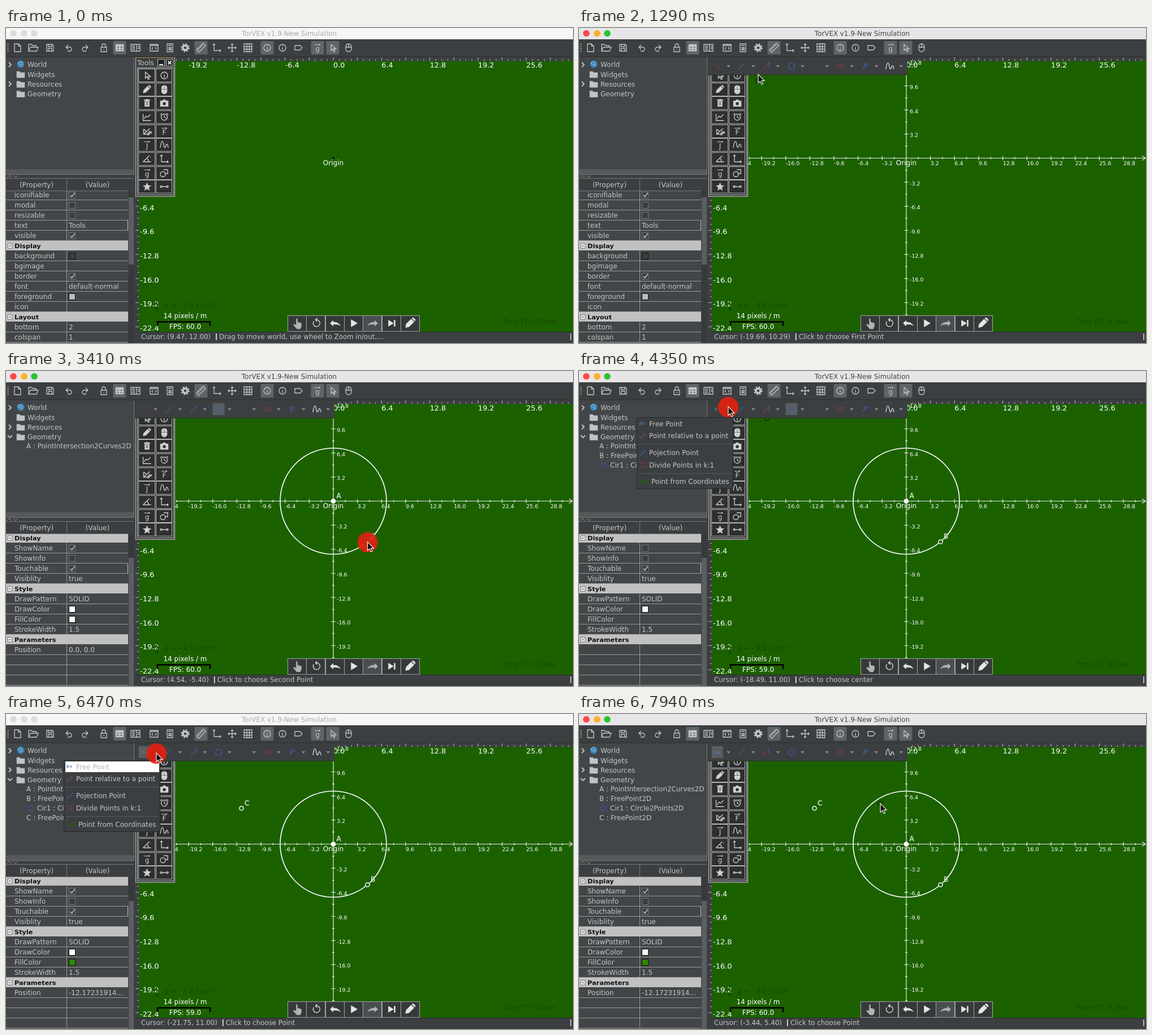
Recreate the animation shown at these times as an HTML page. Size 1003x558 px, loop 8000 ms.

```html
<!DOCTYPE html>
<html lang="en">
<head>
<meta charset="utf-8">
<title>Geometry tools</title>
<style>
html, body { margin: 0; width: 100%; height: 100%; overflow: hidden; background: #3c3f41; }
svg { display: block; width: 1003px; height: 558px; }
text { font: 12px "DejaVu Sans", Verdana, sans-serif; white-space: pre; }
.bold { font-weight: bold; }
.slant { font-style: italic; }
</style>
</head>
<body>
<svg id="app" viewBox="0 0 1003 558" xmlns="http://www.w3.org/2000/svg"></svg>
<script>
const LOOP = 8000, OX = 579, OY = 230.5, PX = 13.333, STEP = 3.2;
const PANEL = "#3c3f41", TREE = "#424648", INK = "#c4c5c5", GREEN = "#1c6100", WHITE = "#fff", FAINT = "#184700";
const app = document.getElementById("app");
const $ = id => document.getElementById(id);

// Markup helpers; text is placed by its vertical middle
const rect = (x, y, w, h, fill, extra = "") => `<rect x="${x}" y="${y}" width="${w}" height="${h}" fill="${fill}" ${extra}/>`;
const path = (d, stroke = INK, w = 1.3, fill = "none", extra = "") =>
  `<path d="${d}" fill="${fill}" stroke="${stroke}" stroke-width="${w}" ${extra}/>`;
const circle = (x, y, r, fill, extra = "") => `<circle cx="${x}" cy="${y}" r="${r}" fill="${fill}" ${extra}/>`;
const text = (x, y, s, fill = INK, size = 12, extra = "") =>
  `<text x="${x}" y="${y + size * .365}" fill="${fill}" style="font-size:${size}px" ${extra}>${s}</text>`;
const mid = (x, y, s, fill, size, extra = "") => text(x, y, s, fill, size, `text-anchor="middle" ${extra}`);
const group = (id, body, extra = "") => `<g id="${id}" ${extra}>${body}</g>`;
const ring = r => `M${-r} 0a${r} ${r} 0 1 0 ${2 * r} 0a${r} ${r} 0 1 0 ${-2 * r} 0`;
const range = (a, b) => Array.from({ length: b - a + 1 }, (_, i) => a + i);

// "!" marks a filled shape, "~" a letter under an arrow
function icon(x, y, d, color = INK, scale = 1) {
  const at = `transform="translate(${x} ${y}) scale(${scale})"`;
  if (d[0] === "~") return `<g ${at}>` + mid(0, 1.5, d[1], color, 12) + path("M-5-5.500H5M3-7l2 1.500L3-4", color, 1) + "</g>";
  return d[0] === "!" ? path(d.slice(1), color, .5, color, at + ' fill-rule="evenodd"') : path(d, color, 1.3, "none", at);
}

const ICON = {
  arrow: "M-3-6v11l3-3 2 5 2-1-2-4h4Z",
  info: ring(6) + "M0-3.5v1M0-1v5",
  pencil: "!M-7 6l1-5 7-7 4 4-7 7ZM2-7l2-1 3 3-1 2Z",
  mouse: "!M-5-1v-2a5 5 0 0 1 4.5-4.500v6.500ZM.5-7.500A5 5 0 0 1 5-3v2H.500ZM-5 0H5v3a5 5 0 0 1-10 0Z",
  trash: "!M-5-6h3l1-1h2l1 1h3v2H-5ZM-4-3H4v9h-8ZM-2-1l1.500 2L-2 3l1 1 1-1.500L1 4l1-1-1.500-2L2-1 1-2 0-.5-1-2Z",
  camera: "!M-7-4h4l1-2h4l1 2h4v10h-14ZM-3 1a3 3 0 1 0 6 0a3 3 0 1 0-6 0Z",
  graph: "M-7-6V6H7M-5 3l3-5 3 2 5-5",
  clock: ring(5.500) + "M0-3v3l3 2M-7-4l3-3M7-4l-3-3",
  vector: "M-6 5L5-5M-6-4l5 4M-6-4v9h9M1 2l3 3-3 2M4-1v7M4 2h4M6 0l2 2-2 2",
  curve: "M-7 5c2-16 5-12 6-5s3 5 4 1 3-3 4 4",
  angle: "M-7 5H7M-7 5L4-6M0-1q3 2 2 6M6-4v1",
  axes: "M-5-7V5H7M-7-5l2-2 2 2M5 3l2 2-2 2",
  shapes: "M-1-6H6V1H1M-7 2a4.500 4.500 0 1 0 9 0a4.500 4.500 0 1 0-9 0",
  star: "!M0-7l2 5 5 .3-4 3.300 1.400 5L0 4l-4.400 2.600 1.400-5-4-3.300 5-.3Z",
  link: "M-5 0H5M-7 0a1.500 1.500 0 1 0 3 0a1.500 1.500 0 1 0-3 0M4 0a1.500 1.500 0 1 0 3 0a1.500 1.500 0 1 0-3 0",
  undo: "M-5-1H2a4 4 0 0 1 0 7H-3M-2-5l-4 4 4 4",
  redo: "M5-1H-2a4 4 0 0 0 0 7H3M2-5l4 4-4 4",
  folder: "!M-7-5h5l2 2h7V6H-7Z"
};

function titleBar() {
  return rect(0, 0, 1003, 20, "#f6f6f6", 'id="bar"') +
    [13, 32, 50].map((x, i) => circle(x, 9.500, 5.800, "#dcdcdc", `id="light${i}"`)).join("") +
    mid(501, 10, "TorVEX v1.9-New Simulation", "#aaa", 11.900, 'id="title"');
}

function mainToolbar() {
  const items = [
    [20, "M-5-7H2l4 4V7H-5ZM2-7v4h4"], [48, "M-8 6V-6h5l2 2h6v3M-8 6l3-7H9L6 6Z"],
    [78, "M-6-6H4l2 2V6H-6ZM-3-6v4h6v-4M-3 6V1h6v5"], [112, ICON.undo], [139, ICON.redo],
    [173, "M-5-1H5V7H-5ZM-3-1v-3a3 3 0 0 1 6 0v3M0 2v2"], [201, "!M-7-6H7V6H-7ZM-5-2V0h4v-2ZM1-2V0h4v-2ZM-5 2v2h4V2ZM1 2v2h4V2Z", 1],
    [229, "M-8-6H8V6H-8ZM2-6V6M-6-3h5M-6 0h5M-6 3h5M4-2h3M4 1h3"], [262, "M-7-6H7V6H-7ZM-7-4H7M-2-1l-2 2 2 2M2-1l2 2-2 2"],
    [290, "M-5-7H5V7H-5ZM-3-4H3M-3 0H3M-3 3H3M-1-1V5M2-1V5"], [317, ""],
    [345, "M-8 4L4-8l4 4L-4 8ZM-5 1l2 2M-2-2l2 2M1-5l2 2", 1], [373, ICON.axes],
    [400, "M0-7V7M-7 0H7M-2-5l2-2 2 2M-2 5l2 2 2-2M-5-2l-2 2 2 2M5-2l2 2-2 2"],
    [428, "M-7-7H7V7H-7ZM-2-7V7M2.500-7V7M-7-2H7M-7 2.500H7"], [462, ICON.info, 1], [489, ICON.info],
    [517, "M-6-4H3l4 4-4 4h-9Z"], [551, "~g", 1], [578, ICON.arrow, 1], [606, "M-5-2a5 5 0 0 1 10 0v4a5 5 0 0 1-10 0ZM-5-1H5M0-7v6"]
  ];
  return rect(0, 20, 1003, 32, PANEL) + path("M0 51H1003", "#2c2e2f", 1) + path("M3.500 28v14", "#aaa", 2, "none", 'stroke-dasharray="2 2"') +
    items.map(([x, d, on]) => (on ? rect(x - 11.500, 23, 23, 24, "#5f6467", 'rx="2"') : "") + (d ? icon(x, 35, d) : "")).join("") +
    circle(317, 35, 4, "none", `stroke="${INK}" stroke-width="3.500"`) +
    circle(317, 35, 6.500, "none", `stroke="${INK}" stroke-width="2.500" stroke-dasharray="2.600 2.500"`);
}

function tree() {
  const rows = ["World", "Widgets", "Resources", "Geometry"];
  const chevron = y => path(`M5 ${y - 4}l4 4-4 4`, INK, 1.800);
  return rect(0, 52, 229, 506, PANEL) + rect(-.5, 51.500, 227, 208, TREE, 'stroke="#777" stroke-width="1"') +
    rows.map((s, i) => text(38, 65 + 17.200 * i, s) + (i ? icon(26, 82 + 17.200 * (i - 1), ICON.folder, "#bfc3c5") : "")).join("") +
    circle(26, 64, 6.500, "#3b83b7") + path("M21 62q5-4 8 0l-3 4zM27 68l3-3", "#a8c8d8", 1) +
    chevron(65) + chevron(99) + group("expand", path("M3 114l4 4 4-4", INK, 1.800)) +
    group("rowA", text(36, 133, "A : PointIntersection2Curves2D", INK, 11.900)) +
    group("rowB", text(36, 150, "B : FreePoint2D") + circle(43, 167, 5, "none", 'stroke="#3d4fa8" stroke-width="1.200"') +
      text(55, 167, "Cir1 : Circle2Points2D")) +
    group("rowC", text(36, 184, "C : FreePoint2D")) +
    rect(0, 250, 226, 9, "#55595b") + path("M2 265l4-4 4 4M13 261l4 4 4-4", "#999", 1);
}

function props(id, rows, thumb) {
  let out = rect(0, 287, 216, 271, TREE) + rect(217, 289, 9, 269, "#37393b") + rect(217, thumb[0], 9, thumb[1], "#5b5f61");
  rows.forEach((row, i) => {
    const y = 287 + 18 * i, c = y + 9, [name, value = ""] = row.split("|");
    if (name[0] === "*") {
      out += rect(0, y, 216, 17, "#c1c1c1") + rect(3, c - 4, 8, 8, "#eee", 'stroke="#777"') + path(`M5 ${c}h4`, "#333", 1) +
        text(15, c, name.slice(1), "#111", 11.300, 'class="bold"');
      return;
    }
    out += path(`M0 ${y + 17.500}H216M107.500 ${y - .5}v18`, "#999", 1) + text(15, c, name);
    if (value[0] === "[") {
      out += rect(111.500, c - 5.500, 11, 11, "#3b3e40", 'stroke="#777"');
      if (value[1] === "x") out += path(`M114 ${c}l2.500 3 5-7`, INK, 1.500);
    } else if (value[0] === "#") out += rect(111.500, c - 5.500, 11, 11, value, 'stroke="#111"');
    else out += text(111, c, value);
  });
  return group(id, out + path("M215.500 341v17", "#ccc", 1));
}

function propPanels() {
  const shape = (name, fill, pos) => ["*Display", "ShowName|" + name, "ShowInfo|[ ]", "Touchable|[x]", "Visiblity|true", "*Style",
    "DrawPattern|SOLID", "DrawColor|#ffffff", "FillColor|" + fill, "StrokeWidth|1.5", "*Parameters", pos, "", "", ""];
  const tools = ["iconifiable|[x]", "modal|[ ]", "resizable|[ ]", "text|Tools", "visible|[x]", "*Display", "background|#3c3f41", "bgimage",
    "border|[x]", "font|default-normal", "foreground|#bbbbbb", "icon", "*Layout", "bottom|2", "colspan|1"];
  return props("propsTools", tools, [300, 119]) + props("propsA", shape("[x]", "#ffffff", "Position|0.0, 0.0"), [331, 227]) +
    props("propsCircle", shape("[ ]", "", ""), [331, 227]) +
    props("propsC", shape("[x]", "#2a8a00", "Position|-12.17231914..."), [331, 227]) +
    rect(0, 266, 226, 22, PANEL) + path("M0 266.500H226M0 288.500H216M107.500 267v22", "#777", 1) +
    mid(54, 277.5, "(Property)") + mid(162, 277.5, "(Value)");
}

function axes() {
  let d = `M300 ${OY}H1002M996 ${OY - 4}l6 4-6 4M${OX} 58V538`, labels = "";
  for (const i of range(-13, 19)) d += `M${OX + i * 21.333} ${OY - (i % 2 ? 2 : 3.500)}v${i % 2 ? 4 : 7}`;
  for (const i of range(-8, 14)) d += `M${OX - (i % 2 ? 2 : 3.500)} ${OY + i * 21.333}h${i % 2 ? 4 : 7}`;
  for (const i of range(-7, 9)) if (i) labels += text(OX + i * STEP * PX, 240, (i * STEP).toFixed(1), WHITE, 9.500);
  for (const i of range(-4, 6)) if (i) labels += text(585, OY + i * STEP * PX + 2, (-i * STEP).toFixed(1), WHITE, 9.500);
  return group("axes", path(d, "#e4eee0", 1.200) + labels);
}

const point = (x, y, name, fill) => circle(x, y, 3.600, fill, 'stroke="#fff" stroke-width="1.500"') +
  text(x + 5.500, y - 9.5, name, "#dce6d8", 12, 'stroke="#dce6d8" stroke-width=".3"');

function controls() {
  const icons = ["!M-2-8q2-1.500 2 1v5l7 2v5l-2 5h-6l-6-7 1-1.500 4 2Z", "M-4-3.500a6 6 0 1 0 4-2.500M2-9l-3 3 3 3",
    "!M-9 0l5-5v3q8-1 13 6-5-3-13-2v3Z", "!M-5-6.500L6 0-5 6.500Z", "!M9 0L4-5v3q-8-1-13 6 5-3 13-2v3Z",
    "!M-6-5.500L3 0l-9 5.500ZM4-5.500h2v11H4Z", ICON.pencil];
  return icons.map((d, i) => {
    const x = Math.round(499 + 33.3 * i) - .5;
    return rect(x, 509.500, 33, 28, i === 4 ? "#4b4e50" : "#36393a", 'stroke="#a4a6a6"') +
      icon(x + 17, 523, d, i === 0 || i === 4 ? "#b4b4b4" : "#e6e6e6", i === 6 ? 1.25 : 1);
  }).join("");
}

function stage() {
  let ticks = "", labels = "";
  for (const i of range(-32, 39)) ticks += `M${OX + i * 10.667} 58v${i % 4 ? -3 : -6}`;
  for (const i of range(-16, 28)) ticks += `M235 ${OY + i * 10.667}h${i % 4 ? -3 : -6}`;
  for (const i of range(-3, 4)) labels += text(OX + i * 85.333, 65, (i * 6.4).toFixed(1), WHITE, 12.800);
  for (const i of range(2, 7)) labels += text(237, OY + i * 42.667 + 2, (-i * STEP).toFixed(1), WHITE, 13);
  return rect(229, 52, 774, 486, GREEN) + rect(229, 52, 774, 6.500, PANEL) + rect(229, 52, 6, 486, PANEL) +
    path(ticks, "#bbb", 1) + labels + axes() + circle(OX, OY, 2, "#111", 'id="dot"') +
    mid(OX, 239, "Origin", WHITE) +
    text(280, 490.5, "g = - 9.8 j m/s²", FAINT, 12, 'class="slant"') + path("M267 484v16M264 496l3 5 3-5", FAINT, 1.300) +
    text(879, 520, "Time (T): 0.0sec", FAINT, 11.800) +
    mid(317, 510, "14 pixels / m", WHITE) + path("M268 528v-7.500H361v7.500", "#000", 2.600) + mid(317, 529, "FPS: 60.0", WHITE, 12, 'id="fps"') +
    circle(OX, OY, 0, "none", 'id="round" stroke="#fff" stroke-width="1.600"') +
    group("ptA", point(OX, OY, "A", WHITE)) + group("ptB", point(639.5, 302.5, "B", GREEN)) + group("ptC", point(416.5, 167, "C", GREEN)) +
    circle(0, 0, 4, "none", 'id="marker" stroke="#0c2404" stroke-width="1.400"') +
    group("hover", circle(OX, OY, 4, "#c9cfc6") + rect(593, 236, 104, 16, WHITE) + mid(645, 243.500, "new intersection", GREEN, 11.800)) +
    controls();
}

function toolsPanel() {
  const names = ["arrow", "info", "pencil", "mouse", "trash", "camera", "graph", "clock", "vector", "~F", "~J", "curve",
    "angle", "axes", "~g", "shapes", "star", "link"];
  const top = i => Math.round(72 + (i >> 1) * 24.65);
  const cell = (i, fill, extra) => rect(i % 2 ? 265.500 : 234.500, top(i) + .5, i % 2 ? 28 : 29, 23, fill, extra);
  const dash = i => cell(i, "none", 'stroke="#fff" stroke-dasharray="1 1"');
  return rect(229.5, 52.500, 69, 246, PANEL, 'stroke="#c0c0c0"') + path("M229 52.500H299", "#b98a55", 1) +
    rect(232.500, 70.500, 64, 225, "#27292a", 'stroke="#c0c0c0"') + text(232, 61.5, "Tools") +
    rect(268.500, 55.500, 12, 12, "#222", 'stroke="#bbb"') + rect(283.500, 55.500, 12, 12, "#222", 'stroke="#bbb"') +
    path("M271 65h7M286.500 58.500l6 6M292.500 58.500l-6 6", "#eee", 1.800) +
    names.map((n, i) => cell(i, "#2d2f30", 'stroke="#b4b6b6"') + icon(i % 2 ? 280 : 249.500, top(i) + 12, ICON[n] || n, "#d0d0d0")).join("") +
    group("focus0", dash(0)) + group("focus15", dash(15));
}

const BLUE = "#3566b5", RED = "#94393b";
const pointIcon = (x, y) => path(`M${x - 4} ${y + 3}v-5h3v3h-3`, "#4f7fae", 1) + circle(x + 3, y, 1.400, "none", 'stroke="#4f7fae"');

function shapeToolbar() {
  const at = i => 245 + 43.600 * i;
  const drops = range(0, 7).map(i => path(`M${at(i) + 16} 66h7l-3.500 4Z`, "none", 0, "#85898b")).join("");
  return group("shapes", rect(229, 52, 352, 31, PANEL) + path("M229 83H581", "#2a3a25", 1.500) +
    rect(365.500, 57, 21, 21, "#595d60", 'id="pickCircle"') + rect(234.500, 57, 20, 21, "#595d60", 'id="pickPoint"') + drops +
    group("dots", path("M240 64l3 2M247 62l2 3M241 72l3-1M246 68l4 4", RED, 1.300)) + group("pIcon", pointIcon(245, 68)) +
    path("M282 73l11-11M502 63h8M506 64l-4 9M504 70l7-6", BLUE, 1.200, "none", 'stroke-dasharray="4 1"') +
    path("M413 65l4 2 6-3", "#2f4a78", 1) +
    path("M326 73l6-6", RED, 1.400) + path("M333 66l3-4v8", BLUE, 1.200) +
    circle(376, 68, 5.500, "none", `stroke="${BLUE}" stroke-width="1.200"`) +
    `<ellipse cx="462.500" cy="68" rx="6" ry="3.500" fill="none" stroke="${RED}" stroke-width="1.200"/>` + circle(462.5, 68, 1, BLUE) +
    icon(550, 68, ICON.curve, "#ddd"));
}

function popup() {
  const rows = [[115, "Point relative to a point"], [145, "Pojection Point"], [167, "Divide Points in k:1"]];
  return group("popup", rect(102.5, 82.5, 170, 126, PANEL, 'stroke="#25282a"') +
    rect(105, 84, 166, 19, WHITE, 'id="lit"') + text(124, 93.500, "Free Point", INK, 12, 'id="free"') + pointIcon(112, 93) +
    rows.map(([y, s]) => text(124, y, s)).join("") + text(128, 196, "Point from Coordinates") +
    path("M106 129.500H270M106 181.500H270", "#565a5c", 1) + path("M108 119l4-4M114 112l3-1", RED, 1.600) +
    path("M113 117l4-5M108 150l10-10", BLUE, 1.200) + path("M108 163l3 1M114 162l2 2M109 170l3-1M114 168l4 3", RED, 1.600) +
    path("M108 196h13", "#285a18", 5, "none", 'stroke-dasharray="3 1"'));
}

app.innerHTML = stage() + toolsPanel() + shapeToolbar() + tree() + propPanels() +
  rect(229, 538, 774, 20, PANEL) + path("M229 538.500H1003", "#2c2e2f", 1) + path("M999 541v12", "#ddd", 1.500) +
  text(239, 547, "", INK, 11.800, 'id="where"') + path("M0 541v12", "#ddd", 1.800, "none", 'id="bar2"') +
  text(0, 547, "", INK, 11.800, 'id="hint"') + mainToolbar() + titleBar() + popup() +
  circle(0, 0, 18, "#df2210", 'id="press"') +
  group("mouse", path("M0 0V15.500l3.500-3.200 2.500 5.500 2.500-1.100-2.500-5.300h5Z", WHITE, 1.100, "#0a0a0a"));

// Pointer route: time, x, y
const ROUTE = [[120, 334, 264], [180, 308, 257], [350, 308, 257], [520, 281, 256], [760, 281, 256], [1200, 316.5, 95], [1290, 317, 82],
  [1380, 317, 82], [1720, 376, 68], [2020, 376, 68], [2440, 585.1, 235.2], [2680, 585.1, 235.2], [3060, 639.5, 302.5],
  [3500, 639.5, 302.5], [4120, 264, 63], [4480, 264, 63], [4760, 254, 91], [5000, 254, 91], [5440, 416.75, 167],
  [5700, 416.75, 167], [6300, 266, 69], [6640, 266, 69], [6940, 254, 91], [7120, 254, 91], [7180, 255, 92], [7440, 255, 92],
  [7920, 533.15, 158.5]];
const PRESSES = [540, 1740, 2590, 3360, 4280, 4800, 5500, 6400, 7350];
// Spans in which the pointer is off the canvas: from, to, last coordinates
const HELD = [[0, 120, 9.47, 12], [400, 900, -20.85, -1.95], [1240, 2080, -19.69, 10.29], [4060, 5060, -18.49, 11], [6180, 7520, -21.75, 11]];
const within = (t, ...spans) => spans.some(([a, b]) => t >= a && t < b);
const show = (id, on) => { $(id).style.display = on ? "" : "none"; };

function pointer(t) {
  const i = ROUTE.findIndex(k => k[0] > t);
  if (i < 0) return ROUTE[ROUTE.length - 1].slice(1);
  if (i === 0) return ROUTE[0].slice(1);
  const [t0, x0, y0] = ROUTE[i - 1], [t1, x1, y1] = ROUTE[i];
  const p = (t - t0) / (t1 - t0), e = p * p * (3 - 2 * p);
  return [x0 + (x1 - x0) * e, y0 + (y1 - y0) * e];
}

function hintAt(t) {
  if (t < 660) return "Drag to move world, use wheel to Zoom in/out,...";
  if (t < 2000) return "Click to choose First Point";
  if (t >= 5000) return "Click to choose Point";
  return within(t, [2640, 3480]) ? "Click to choose Second Point" : "Click to choose center";
}

function update(t) {
  const [x, y] = pointer(t);
  const open = t >= 660, menu = within(t, [4320, 5000], [6420, 7480]), lit = within(t, [4420, 5000], [6450, 7480]);
  const active = t >= 560 && !lit;

  $("bar").setAttribute("fill", active ? "#e7e5e7" : "#f6f6f6");
  $("title").setAttribute("fill", active ? "#444" : "#aaa");
  ["#fb4948", "#fdb024", "#29c231"].forEach((c, i) => $("light" + i).setAttribute("fill", active ? c : "#dcdcdc"));

  show("axes", open); show("shapes", open); show("dot", !open);
  show("focus0", t < 560); show("focus15", within(t, [560, 4320]));
  show("pickCircle", within(t, [2000, 5000])); show("pickPoint", t >= 5000);
  show("dots", t < 4320); show("pIcon", t >= 4320);
  show("popup", menu); show("lit", lit);
  $("free").setAttribute("fill", lit ? "#b4b4b4" : INK);

  const expanded = t >= 2640, drawn = t >= 3480, placed = t >= 5640;
  show("expand", expanded); show("rowA", expanded); show("rowB", drawn); show("rowC", placed);
  show("propsTools", !expanded); show("propsA", expanded && !drawn); show("propsCircle", drawn && !placed); show("propsC", placed);

  show("hover", within(t, [2400, 2640])); show("ptA", expanded); show("ptB", t >= 3400); show("ptC", t >= 5500);
  const r = t < 2700 ? 0 : t < 3060 ? Math.hypot(x - OX, y - OY) : 94;
  $("round").setAttribute("r", r);
  $("fps").textContent = within(t, [4200, 4940], [6000, 6800]) ? "FPS: 59.0" : "FPS: 60.0";

  const held = HELD.find(h => within(t, h));
  const [wx, wy] = held ? held.slice(2) : [(x - OX) / PX, (OY - y) / PX];
  $("marker").setAttribute("transform", `translate(${OX + wx * PX} ${OY - wy * PX})`);
  show("marker", open && !within(t, [2400, 2640]));
  $("where").textContent = `Cursor: (${wx.toFixed(2)}, ${wy.toFixed(2)})`;
  const end = 239 + $("where").getComputedTextLength();
  $("bar2").setAttribute("transform", `translate(${end + 10} 0)`);
  $("hint").setAttribute("x", end + 15);
  $("hint").textContent = hintAt(t);

  show("mouse", t >= 120);
  $("mouse").setAttribute("transform", `translate(${x} ${y})`);
  const start = PRESSES.find(s => within(t, [s, s + 240])), p = (t - start) / 240;
  show("press", start !== undefined);
  if (start !== undefined) {
    $("press").setAttribute("transform", `translate(${x} ${y + 1})`);
    $("press").setAttribute("r", 17.5 + 2 * p);
    $("press").setAttribute("opacity", .93 * Math.min(1, (1 - p) * 2.5));
  }
}

const begin = performance.now();
function frame() {
  update((performance.now() - begin) % LOOP);
  requestAnimationFrame(frame);
}
frame();
</script>
</body>
</html>
```
